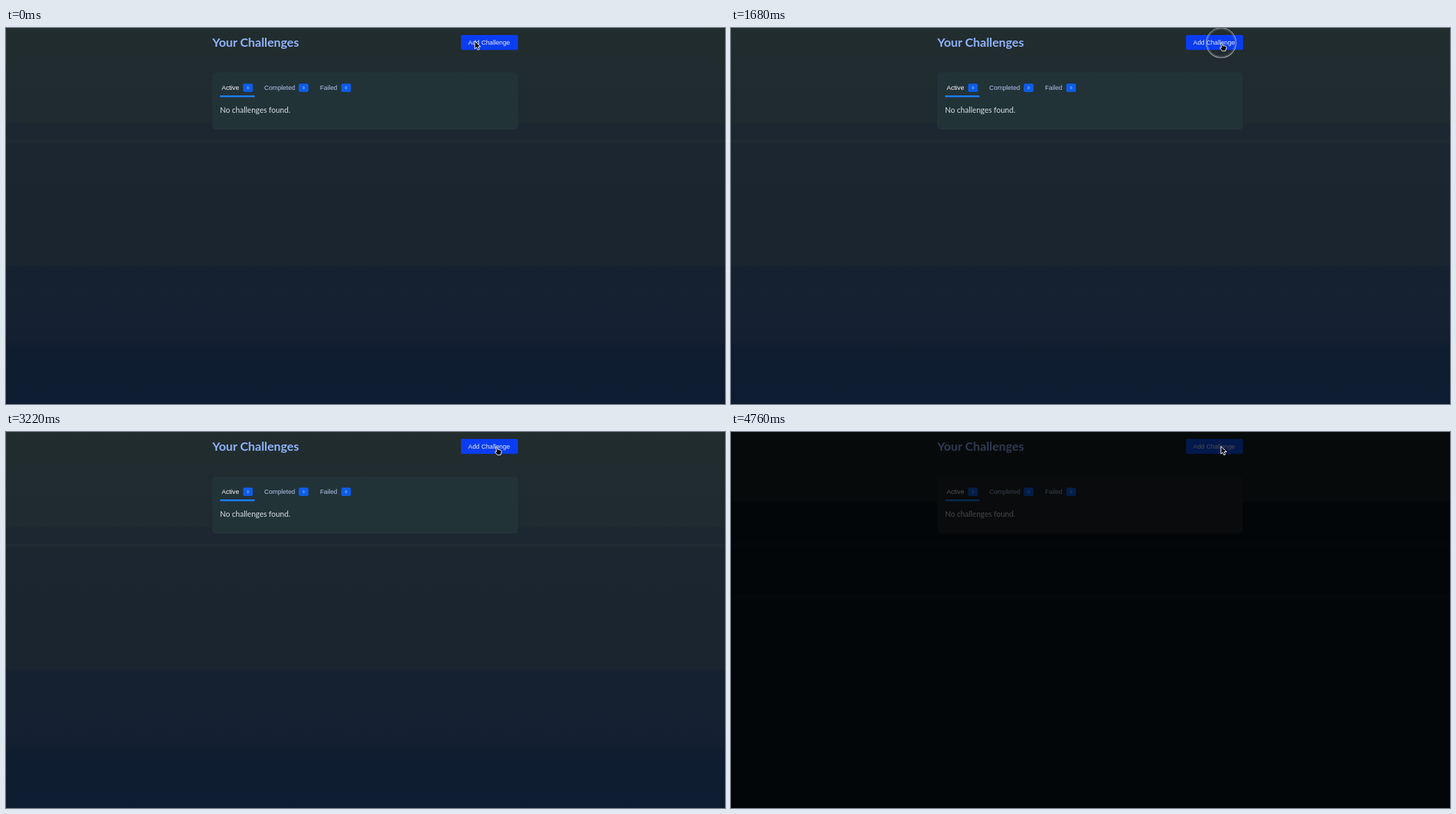
Animation, 1035 px wide and 541 px high, one loop 4.83 s. Source, as an HTML page:

```html
<!DOCTYPE html>
<html lang="en">
<head>
<meta charset="utf-8">
<title>Challenges</title>
<style>
  html, body { margin: 0; width: 100%; height: 100%; overflow: hidden; background: #020609; }
  svg { display: block; width: 1035px; height: 541px; }
  text { font: 9.17px "Liberation Sans", Arial, sans-serif; }
  .lato { font: 11px Lato, sans-serif; }
  .title { font: bold 17.6px Lato, sans-serif; }
  .head { font: bold 16.6px Lato, sans-serif; fill: #0b0d10; }
  .label { font: bold 9.4px Lato, sans-serif; fill: #2c3138; }
  .date { font: 9.17px "Noto Sans CJK KR", "Noto Sans CJK", sans-serif; fill: #555; }
  .count { font-size: 5.5px; fill: #cfe0ff; text-anchor: middle; }
  .field { fill: none; stroke: #d3d6db; }
</style>
</head>
<body>
<svg viewBox="0 0 1035 541">
  <defs>
    <linearGradient id="lit" x2="0" y2="541" gradientUnits="userSpaceOnUse">
      <stop offset="0" stop-color="#222d2e"/>
      <stop offset=".25" stop-color="#1f2a31"/>
      <stop offset=".255" stop-color="#1c2731"/>
      <stop offset=".296" stop-color="#1c2731"/>
      <stop offset=".298" stop-color="#1f2a32"/>
      <stop offset=".304" stop-color="#1f2a32"/>
      <stop offset=".308" stop-color="#1b2630"/>
      <stop offset=".63" stop-color="#1a2530"/>
      <stop offset=".635" stop-color="#162130"/>
      <stop offset=".83" stop-color="#142031"/>
      <stop offset=".85" stop-color="#101d30"/>
      <stop offset="1" stop-color="#0d1c31"/>
    </linearGradient>
    <clipPath id="disc"><circle r="15.2"/></clipPath>
    <filter id="soft" x="-20%" y="-40%" width="140%" height="200%"><feGaussianBlur stdDeviation="1.6"/></filter>
  </defs>

  <rect id="bright" width="1035" height="541" fill="url(#lit)"/>
  <g id="dim">
    <rect width="1035" height="541" fill="#08141c"/>
    <rect width="1035" height="100" fill="#161e22"/>
    <path d="M0 160h1035v6H0zM0 233h1035v9H0z" fill="#0f1a20"/>
  </g>

  <text class="title" x="297" y="27" fill="#8fb3fb">Your Challenges</text>
  <rect id="add" x="655" y="10" width="82" height="21.5" rx="2.5"/>
  <text x="665.3" y="23.8" fill="#e6ecff">Add Challenge</text>

  <rect id="panel" x="297" y="64" width="440" height="82" rx="5"/>
  <g id="tabs"></g>
  <rect x="308" y="97" width="50" height="2.5" rx="1" fill="#1c80f5"/>
  <text class="lato" x="308" y="121.6" fill="#d8e0e4">No challenges found.</text>

  <rect id="shade" width="1035" height="541" fill-opacity=".68"/>

  <g id="modal">
    <rect x="353" y="35.3" width="327.4" height="296.4" rx="3" fill="#fff"/>
    <text class="head" x="369.6" y="67.5">New Challenge</text>
    <text class="label" x="369.6" y="93.7">Title</text>
    <rect class="field" x="369.9" y="97.5" width="293.6" height="23" rx="2"/>
    <text class="label" x="369.6" y="140.7">Description</text>
    <rect class="field" x="369.9" y="144.6" width="293.6" height="34" rx="2"/>
    <path d="M657 177.5l5.5-5.5M660 177.5l2.5-2.5" stroke="#555" stroke-width=".8"/>
    <text class="label" x="369.6" y="198.7">Deadline</text>
    <rect class="field" x="369.9" y="202.8" width="293.6" height="24.4" rx="2"/>
    <text class="date" x="376" y="218.3">연도. 월. 일.</text>
    <path d="M648.8 212h6.6v6.3h-6.6zM648.5 212.7h7.2M650.3 210.6v1.5M654 210.6v1.5" fill="none" stroke="#111" stroke-width="1.1"/>
    <g id="pics"></g>
    <text x="531.5" y="296.6" fill="#3f4650">Cancel</text>
    <rect x="582" y="284.5" width="82" height="21.5" rx="2.5" fill="#000" opacity=".3" filter="url(#soft)"/>
    <rect x="582" y="282.5" width="82" height="21.5" rx="2.5" fill="#0b5df2"/>
    <text x="592.6" y="296.5" fill="#e6ecff">Add Challenge</text>
  </g>

  <g id="ring" fill="none" stroke="#c4c8cc">
    <circle id="outer" stroke-opacity=".75" stroke-width="1.1"/>
    <circle id="inner" stroke-opacity=".45" stroke-width=".8"/>
  </g>
  <g id="cursor" stroke="#fff" stroke-width="1" stroke-linejoin="round" fill="#000">
    <path id="arrow" d="M0 0V11L2.6 8.7L4.4 12.6L6.4 11.7L4.7 7.9H8.2Z"/>
    <path id="hand" d="M.2 1.2Q1.2 .2 2 1.2L3 5Q4.2 4.3 4.8 5.3Q6 4.8 6.6 5.8Q8 5.5 8.2 7L7.6 10.4L6.8 12.4H2.2L-1.4 8.2Q-1.2 6.8 1 7.8Z"/>
  </g>
</svg>

<script>
const $ = id => document.getElementById(id);
const set = (id, attrs) => { for (const k in attrs) $(id).setAttribute(k, attrs[k]); };
const show = (id, on) => { $(id).style.display = on ? '' : 'none'; };

// Tabs: label, text x, badge x
$('tabs').innerHTML = [['Active', 310.6, 341.3], ['Completed', 371.8, 421.4], ['Failed', 452, 482.6]]
  .map(([name, x, b], i) => `<text x="${x}" y="89.3" fill="${i ? '#b4c6ee' : '#fff'}">${name}</text>
    <rect x="${b}" y="80" width="14" height="12" rx="2.5" fill="#0d5de8"/>
    <text class="count" x="${b + 7}" y="88">0</text>`).join('');

// Small round pictures, each a background plus a few flat paths
const pics = [
  ['#e9effb', '#9db7e8', 'M-12-10h7v12h-7z', '#17305f', 'M-3-8a3 3 0 1 1-5 3l-2 7 2 5-3 8h3l3-8 5 1v7h3l-1-10-4-2 1-4 6-2-7-1z',
    '#24478a', 'M4-12h2v26H4zM10-9h2v23h-2zM5-4h6v2H5zM5 4h6v2H5z'],
  ['#a9c3f0', '#5a3328', 'M-4-9a4 4 0 1 1 8 0v5h-8z', '#e8793a', 'M-9 6l2-9 5-2h4l6 2 2 9-5 3h-9z',
    '#7c4331', 'M-10-1l3 1-1 7-4-1zM8-1l3 1 1 6-4 1z', '#1b2b52', 'M-15 7h30v9h-30z', '#d8e4fb', 'M-5 6h9v3h-9z'],
  ['#d9e6fa', '#6489c5', 'M-15-9l4-4 4 5v14h-8zM6-12l5 2 4 5v11H6z', '#1a3972',
    'M-15 8l9-2 21 3v7h-30zM-8-3h3l1 11h-5zM-1-6h4l2 9-1 7h-5zM7-2h3l2 10H7z', '#fff', 'M-3-11h7v4h-7z'],
  ['#cbd9f6', '#18264f', 'M-3-13q6-3 8 2l-1 5-7 1z', '#3c61aa', 'M-8-3l8-3 6 4 2 9-12 3z',
    '#e58a43', 'M-9 2q5-3 8 0l12-8 2 2L0 7q-2 7-9 5-5-5 0-10z', '#1d356c', 'M-13 11q12-3 22 0l-5 5h-14z'],
  ['#46557f', '#e9effd', 'M-6-10a4 4 0 1 1 8 0a4 4 0 1 1-8 0', '#18284e', 'M-8-4h5l2 6-1 14h-6l-2-13zM-15 9h30v7h-30z',
    '#d5def2', 'M3-5h4l2 8-2 4 1 8H2L1 2z', '#263d70', 'M2 4h6v11H2z'],
  ['#4d7fc5', '#e0ecff', 'M0-14q10 2 14 10v8H2z', '#122c5c', 'M-9-7q4-6 8 0l1 4 5 5 5 1v3H-2l-3 2h18v8h-26l-2-12z',
    '#a8c6f0', 'M3-1h6v5H3z'],
  ['#92a5dc', '#c2cff0', 'M-15-3l10-7 8 4 12-4v12h-30z', '#182b5b',
    'M-2-9a2.2 2.2 0 1 1 4 0l4 4 2 6-4 1 6 10h-4L0 4l-6 8h-4l6-10-4-1 2-6z', '#6d82bd', 'M-15 12h30v4h-30z']
];
$('pics').innerHTML = pics.map(([bg, ...parts], i) => {
  let art = `<circle r="15.2" fill="${bg}"/>`;
  for (let k = 0; k < parts.length; k += 2) art += `<path fill="${parts[k]}" d="${parts[k + 1]}"/>`;
  return `<g transform="translate(${386.2 + 38.4 * i} 255)"><g clip-path="url(#disc)">${art}</g></g>`;
}).join('');

const LOOP = 4830, TICK = 70, DROP = 30;
const clamp = v => Math.max(0, Math.min(1, v));
const smooth = v => { v = clamp(v); return v * v * (3 - 2 * v); };
const within = (t, a, b) => t >= a && t < b;

// Each dialog: backdrop on, entrance start, exit start, backdrop off
const dialogs = [[70, 65, 915, 1400], [1820, 1815, 2735, 3220], [3570, 3614, 4485, LOOP]];
// Click rings: on, off, x, y, radius
const rings = [[910, 980, 741, 43.5, 15], [1680, 1820, 705.6, 21.3, 21.5], [4340, 4480, 706, 21, 16]];
// Cursor stops: start, end, x, y
const moves = [[0, 0, 674.9, 19], [70, 420, 740.8, 42.6], [980, 1680, 705, 20.6], [2590, 2590, 705.2, 20.6]];

// Underdamped spring, 1 at rest start and settling on 0
function spring(s) {
  if (s <= 0) return 1;
  const w = 18.54, d = 12.5;
  return Math.exp(-d * s) * (Math.cos(w * s) + d / w * Math.sin(w * s));
}

function drawDialog(t) {
  const d = dialogs.find(([on, , , off]) => within(t, on, off));
  for (const id of ['dim', 'shade', 'modal']) show(id, d);
  show('bright', !d);
  set('panel', { fill: d ? '#1c2225' : '#223338' });
  set('add', { fill: d ? '#0a4bea' : '#0a3df2' });
  if (!d) return;
  const [, enter, exit] = d;
  const left = clamp((t - exit) / 270);
  const fade = left ? 1 - left : 1 - (1 - clamp((t - enter) / 300)) ** 2;
  const y = left ? DROP * left : DROP * spring((t - enter) / 1000);
  set('modal', { opacity: fade, transform: `translate(0 ${y.toFixed(2)})` });
}

function drawCursor(t) {
  let [, , x, y] = moves[0];
  for (const [a, b, tx, ty] of moves.slice(1)) {
    const p = a === b ? +(t >= a) : smooth((t - a) / (b - a));
    x += (tx - x) * p;
    y += (ty - y) * p;
  }
  const hand = within(t, 1400, 1820) || within(t, 3220, 3570);
  set('cursor', { transform: `translate(${x} ${y})` });
  show('hand', hand);
  show('arrow', !hand);

  const r = rings.find(([on, off]) => within(t, on, off));
  show('ring', r);
  if (!r) return;
  set('ring', { transform: `translate(${r[2]} ${r[3]})` });
  set('outer', { r: r[4] });
  set('inner', { r: r[4] - 1.8 });
}

const start = performance.now();
function frame() {
  const t = Math.floor((performance.now() - start) % LOOP / TICK) * TICK;
  drawDialog(t);
  drawCursor(t);
  requestAnimationFrame(frame);
}
frame();
</script>
</body>
</html>
```
